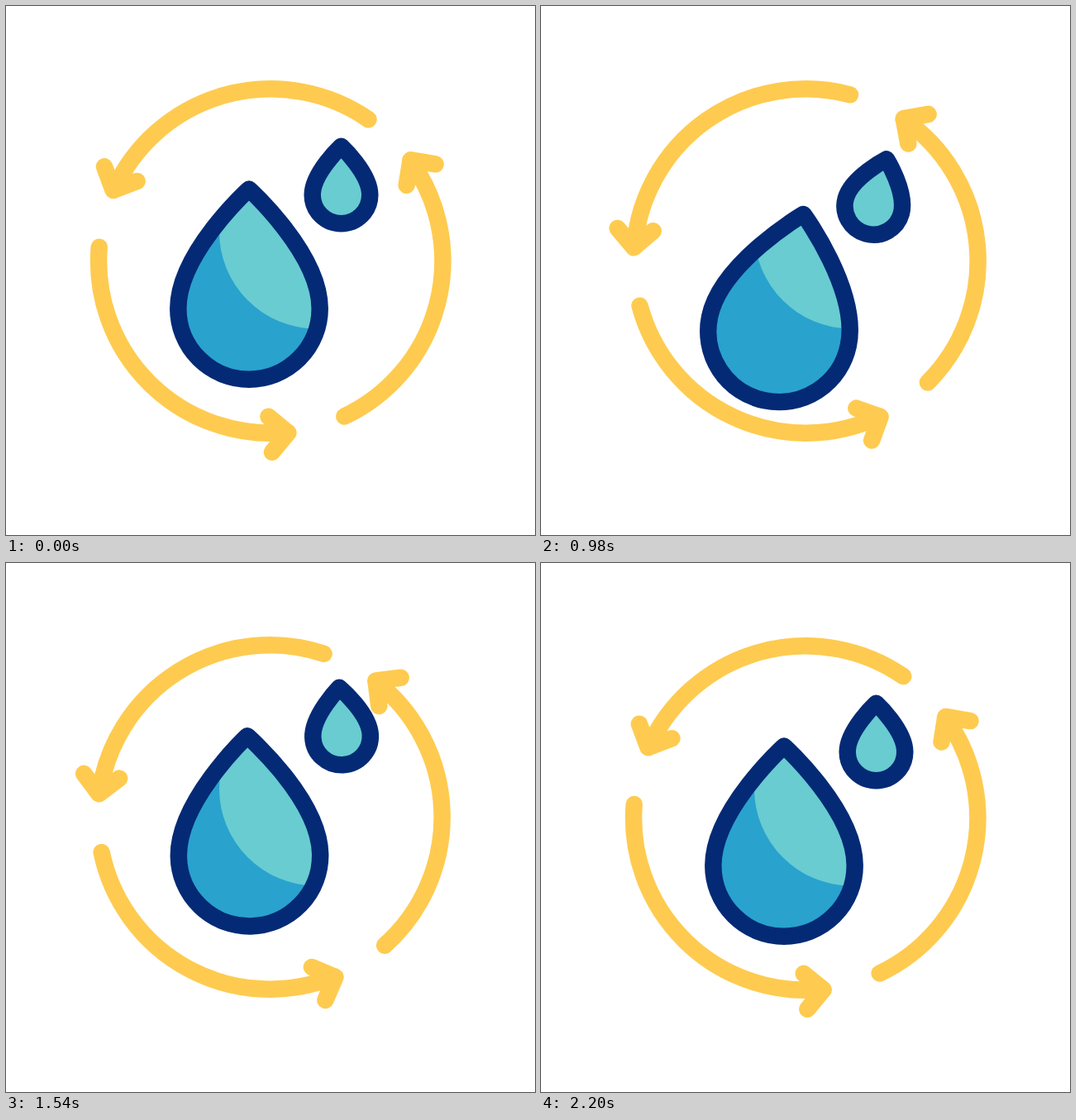
Animation, 640 px wide and 640 px high, one loop 2400 ms. Source, as an HTML page without scripts:

```html
<!DOCTYPE html>
<html lang="en">
<head>
<meta charset="utf-8">
<title>Water cycle</title>
<style>
  html, body { margin: 0; width: 100%; height: 100%; overflow: hidden; background: #fff; }
  svg { display: block; width: 100vw; height: 100vh; }

  .line { fill: none; stroke-width: 20.5; stroke-linecap: round; stroke-linejoin: round; }
  .yellow { stroke: #fecb50; }
  .navy { stroke: #042a75; }
  .light { fill: #68ccd1; }
  .blue { fill: #29a2ce; }

  .wheel, .big, .small {
    --sine: cubic-bezier(.37, 0, .63, 1);
    animation-duration: 2400ms;
    animation-timing-function: var(--sine);
    animation-iteration-count: infinite;
  }
  .wheel {
    transform-origin: 320.2px 307.7px;
    animation-name: spin;
    animation-timing-function: cubic-bezier(.725, -.38, .5, 1);
  }
  .big { transform-origin: 294px 336.5px; animation-name: big-bob, big-tilt; }
  .small { transform-origin: 405.5px 216.5px; animation-name: small-bob, small-tilt; }

  @keyframes spin {
    0% { rotate: 0deg; }
    91.667%, 100% { rotate: -360deg; }
  }
  @keyframes big-bob {
    0%, 91.667%, 100% { translate: 0 0; }
    27.5% { translate: 0 -29.5px; }
    40.833% { translate: 0 28px; }
    60.833% { translate: 0 -15px; }
    77.5% { translate: 0 13px; }
  }
  @keyframes big-tilt {
    0%, 25.833%, 91.667%, 100% { rotate: 0deg; }
    40.833% { rotate: 11.8deg; }
    54.167% { rotate: -7.8deg; }
    70.833% { rotate: 2.5deg; }
  }
  @keyframes small-bob {
    0%, 91.667%, 100% { translate: 0 0; }
    20.833% { translate: 0 -9px; }
    52.917% { translate: 0 24px; }
    64.167% { translate: 0 -19px; }
    78.333% { translate: 0 15.5px; }
  }
  @keyframes small-tilt {
    0%, 91.667%, 100% { rotate: 0deg; }
    27.5% { rotate: -6.5deg; }
    40.833% { rotate: 15.5deg; }
    54.167% { rotate: -6deg; }
    78.333% { rotate: 2.9deg; }
  }
</style>
</head>
<body>
<svg viewBox="0 0 640 640">
  <defs>
    <path id="arrow" d="M112.7 292A208.1 208.1 0 0 0 341.2 515.6M317.7 496.8L341.7 516.3L322.3 539.8"/>
    <path id="drop" d="M294 221.5C294 221.5 379.7 299 379.7 366A85.7 85.7 0 0 1 208.3 366C208.3 299 294 221.5 294 221.5Z"/>
    <clipPath id="inside">
      <path class="big" d="M294 221.5C294 221.5 379.7 299 379.7 366A85.7 85.7 0 0 1 208.3 366C208.3 299 294 221.5 294 221.5Z"/>
    </clipPath>
  </defs>

  <g class="big"><use href="#drop" class="blue"/></g>
  <!-- The highlight stays put while the drop moves over it -->
  <g clip-path="url(#inside)"><circle class="light" cx="375.5" cy="273" r="117.5"/></g>
  <g class="big"><use href="#drop" class="line navy"/></g>

  <g class="small">
    <path class="line navy" style="fill: #68ccd1" d="M405.5 169.7C405.5 169.7 440.3 202 440.3 228.5A34.8 34.8 0 0 1 370.7 228.5C370.7 202 405.5 169.7 405.5 169.7Z"/>
  </g>

  <g class="wheel line yellow">
    <use href="#arrow"/>
    <use href="#arrow" transform="rotate(120 320.2 308.5)"/>
    <use href="#arrow" transform="rotate(240 320.2 308.5)"/>
  </g>
</svg>
</body>
</html>
```
